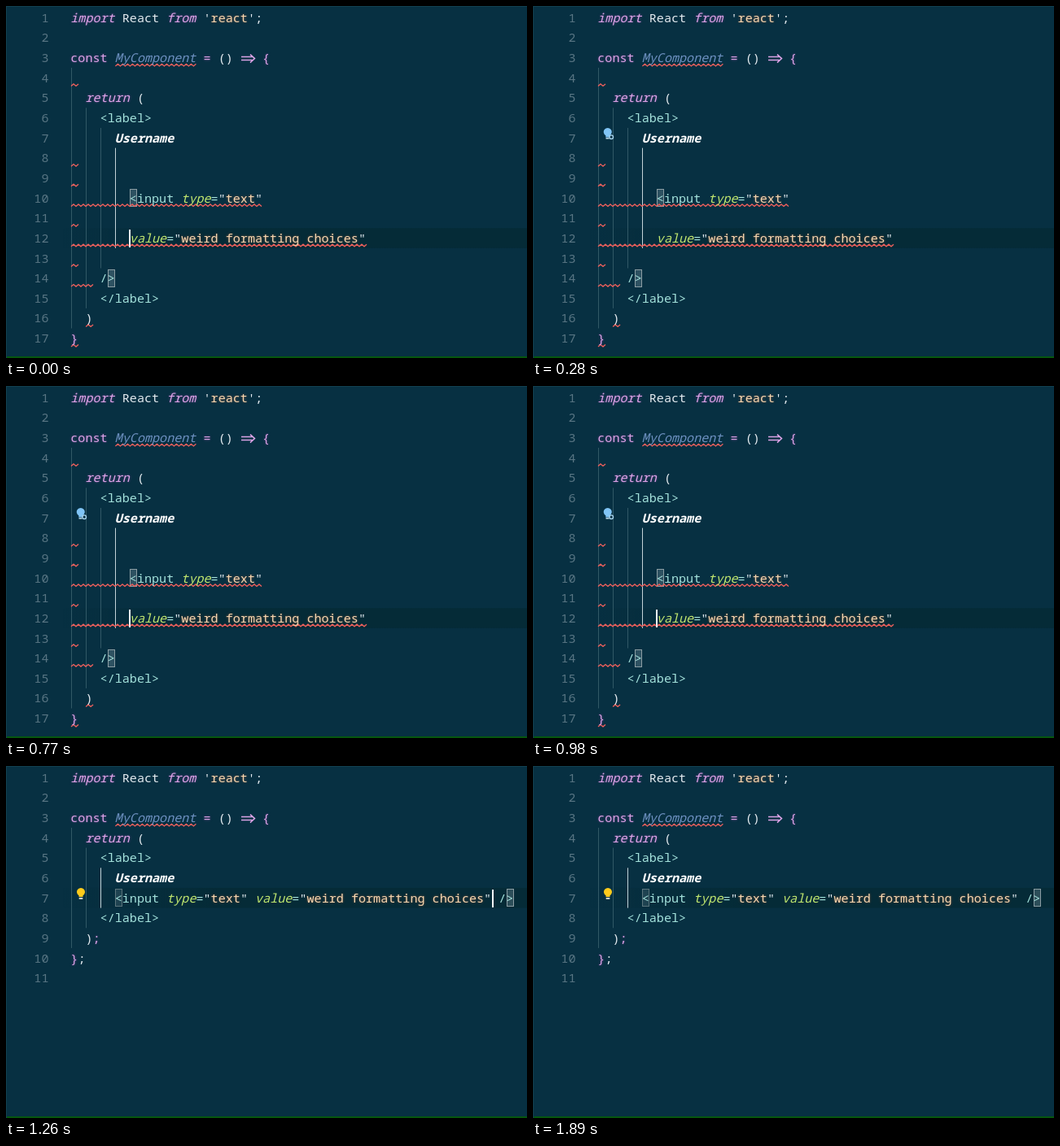
Recreate the animation shown at these times as an HTML page. Size 640 px wide and 433 px high, loop 1.96 s.

```html
<!DOCTYPE html>
<html lang="en">
<head>
<meta charset="utf-8">
<title>Format on save</title>
<style>
  html, body { margin: 0; width: 100%; height: 100%; overflow: hidden; background: #073042; }
  #stage { position: relative; width: 640px; height: 433px; overflow: hidden; background: #073042; }
  #stage::after {
    content: ""; position: absolute; inset: 0; box-sizing: border-box;
    border: solid #12404f; border-width: 1px 0 0 1px; box-shadow: inset 0 -2px #07570f;
  }
  #stage > div, svg { position: absolute; left: 0; top: 0; width: 640px; height: 433px; }
  pre {
    position: absolute; left: 79.3px; top: 1.6px; margin: 0;
    font: 500 15.117px/24.66px "Noto Sans Mono", "DejaVu Sans Mono", monospace;
    font-variant-ligatures: none; color: #e4ebf0;
  }
  pre.nums { left: 0; width: 52.5px; text-align: right; font-weight: 400; color: #587583; }
  pre.row4 { top: 75.58px; }
  pre.row12 { top: 272.86px; }
  b, i { font-weight: inherit; }
  b { font-style: normal; }
  .k { color: #dba3e6; text-shadow: 0 0 3px #c050c080; }
  .s { color: #f6d7b0; text-shadow: 0 0 3px #e8703c80; }
  .t { color: #a4e2dc; }
  .a { color: #c0e66f; }
  .n { color: #6d90c0; }
  .w { color: #fff; font-weight: 600; }

  .hl { fill: url(#shade); }
  .guide { stroke: #315866; }
  .guide.on { stroke: #c3d2d8; }
  .wave { fill: none; stroke: #f0605c; stroke-width: 1.3; }
  .box { fill: #87a0a84d; stroke: #8b9da3; }
  .caret { fill: #f2f6f8; }

  .before, .after, .fresh, .settled, .blue, .yellow, .caret1, .caret2 {
    animation: 1960ms step-end infinite;
  }
  .before { animation-name: before; }
  .after { animation-name: after; }
  .fresh { animation-name: fresh; }
  .settled, .yellow { animation-name: settled; }
  .blue { animation-name: blue; }
  .caret1 { animation-name: caret1; }
  .caret2 { animation-name: caret2; }
  @keyframes before { 0% { opacity: 1 } 53.571%, 100% { opacity: 0 } }
  @keyframes after { 0% { opacity: 0 } 53.571%, 100% { opacity: 1 } }
  @keyframes fresh { 0% { opacity: 1 } 60.714%, 100% { opacity: 0 } }
  @keyframes settled { 0% { opacity: 0 } 60.714%, 100% { opacity: 1 } }
  @keyframes blue { 0% { opacity: 0 } 7.142% { opacity: 1 } 60.714%, 100% { opacity: 0 } }
  @keyframes caret1 { 0% { opacity: 1 } 10.714% { opacity: 0 } 35.714%, 100% { opacity: 1 } }
  @keyframes caret2 { 0% { opacity: 1 } 78.571%, 100% { opacity: 0 } }
</style>
</head>
<body>
<div id="stage">
  <svg viewBox="0 0 640 433">
    <defs>
      <linearGradient id="shade" gradientUnits="userSpaceOnUse" x1="70" x2="260">
        <stop stop-color="#052b37" stop-opacity="0"/>
        <stop offset="1" stop-color="#052b37"/>
      </linearGradient>
    </defs>
    <g id="old" class="before"></g>
    <g id="new" class="after">
      <g id="fresh" class="fresh"></g>
      <g id="settled" class="settled"></g>
    </g>
    <g id="shared"></g>
  </svg>

  <pre class="nums" id="nums"></pre>
  <pre><i class="k">import</i> React <i class="k">from</i> '<b class="s">react</b>';

<b class="k">const</b> <i class="n">MyComponent</i> <b class="k">=</b> ()    <b class="k">{</b></pre>

  <div class="before">
    <pre class="nums row12" id="moreNums"></pre>
    <pre class="row4">

  <i class="k">return</i> (
    <b class="t">&lt;label&gt;</b>
      <i class="w">Username</i>


        <b class="t">&lt;input</b> <i class="a">type</i><b class="t">=</b>"<b class="s">text</b>"

        <i class="a">value</i><b class="t">=</b>"<b class="s">weird formatting choices</b>"

    <b class="t">/&gt;</b>
    <b class="t">&lt;/label&gt;</b>
  )
<b class="k">}</b></pre>
  </div>

  <div class="after">
    <pre class="row4">  <i class="k">return</i> (
    <b class="t">&lt;label&gt;</b>
      <i class="w">Username</i>
      <b class="t">&lt;input</b> <i class="a">type</i><b class="t">=</b>"<b class="s">text</b>" <i class="a">value</i><b class="t">=</b>"<b class="s">weird formatting choices</b>" <b class="t">/&gt;</b>
    <b class="t">&lt;/label&gt;</b>
  )<b class="k">;</b>
<b class="k">}</b>;</pre>
  </div>

  <svg viewBox="0 0 640 433">
    <path d="M289 62.6H302.5M289 66.6H302.5M300 59.6L305.5 64.6L300 69.6" fill="none" stroke="#dba3e6" stroke-width="1.5"/>
    <g class="blue">
      <path d="M89.3 161.5V159.3A5 5 0 1 1 94.2 159.3V161.5Z" fill="#80c4f5"/>
      <path d="M89.5 162.8H93.5" stroke="#b4d3e2" stroke-width="1.6"/>
      <circle cx="96.2" cy="161.2" r="2.3" fill="#073042" stroke="#a9d6ef" stroke-width="1.4"/>
    </g>
    <g class="yellow">
      <path d="M89.5 161V159.3A5 5 0 1 1 94.5 159.3V161Z" fill="#ffcb1c"/>
      <path d="M89.7 162.9H94.3" stroke="#d5d8cf" stroke-width="2"/>
    </g>
    <g class="before"><g id="caretOld" class="caret1"></g></g>
    <g class="after"><g id="caretNew" class="caret2"></g></g>
  </svg>
</div>

<script>
  const CH = 9.07, ROW = 24.66;
  const colX = col => 80 + col * CH;
  const rowY = row => 2 + (row - 1) * ROW;
  const byId = id => document.getElementById(id);

  function add(id, tag, cls, attrs) {
    const el = document.createElementNS("http://www.w3.org/2000/svg", tag);
    el.setAttribute("class", cls);
    for (const key in attrs) el.setAttribute(key, attrs[key]);
    byId(id).append(el);
  }

  function wave(id, row, col, len) {
    const y = rowY(row) + ROW - 3.4, end = colX(col + len);
    let d = "";
    for (let x = colX(col), i = 0; x <= end + 0.5; x += 3, i++) {
      d += `${i ? "L" : "M"}${x.toFixed(1)} ${(y + (i % 2 ? -1.3 : 1.3)).toFixed(1)}`;
    }
    add(id, "path", "wave", { d });
  }

  function guide(id, col, from, to, cls = "guide") {
    const x = Math.floor(colX(col)) + 0.5;
    add(id, "path", cls, { d: `M${x} ${rowY(from)}V${rowY(to + 1)}` });
  }

  const box = (id, row, col) => add(id, "rect", "box", {
    x: Math.floor(colX(col)) + 0.5, y: Math.round(rowY(row)) + 1.5, width: 8, height: 21
  });
  const highlight = (id, row) => add(id, "rect", "hl", { x: 70, y: rowY(row), width: 570, height: ROW });
  const caret = (id, row, col) => add(id, "rect", "caret", {
    x: Math.floor(colX(col)) - 1, y: Math.round(rowY(row)) + 2, width: 2, height: 22
  });
  const count = (from, to) => Array.from({ length: to - from + 1 }, (_, i) => from + i).join("\n");

  byId("nums").textContent = count(1, 11);
  byId("moreNums").textContent = count(12, 17);

  wave("shared", 3, 6, 11);

  // Untidy code
  highlight("old", 12);
  guide("old", 0, 4, 16);
  guide("old", 2, 6, 15);
  guide("old", 4, 7, 13);
  guide("old", 6, 8, 12, "guide on");
  box("old", 10, 8);
  box("old", 14, 5);
  for (const row of [4, 8, 9, 11, 13, 17]) wave("old", row, 0, 1);
  wave("old", 10, 0, 26);
  wave("old", 12, 0, 40);
  wave("old", 14, 0, 3);
  wave("old", 16, 2, 1);
  caret("caretOld", 12, 8);

  // Formatted code
  highlight("new", 7);
  guide("new", 0, 4, 9);
  guide("new", 2, 5, 8);
  guide("new", 4, 6, 7, "guide on");
  box("new", 7, 59);
  wave("fresh", 4, 0, 1);
  wave("fresh", 7, 57, 1);
  wave("fresh", 9, 2, 2);
  wave("fresh", 10, 0, 2);
  box("settled", 7, 6);
  caret("caretNew", 7, 57.2);
</script>
</body>
</html>
```
